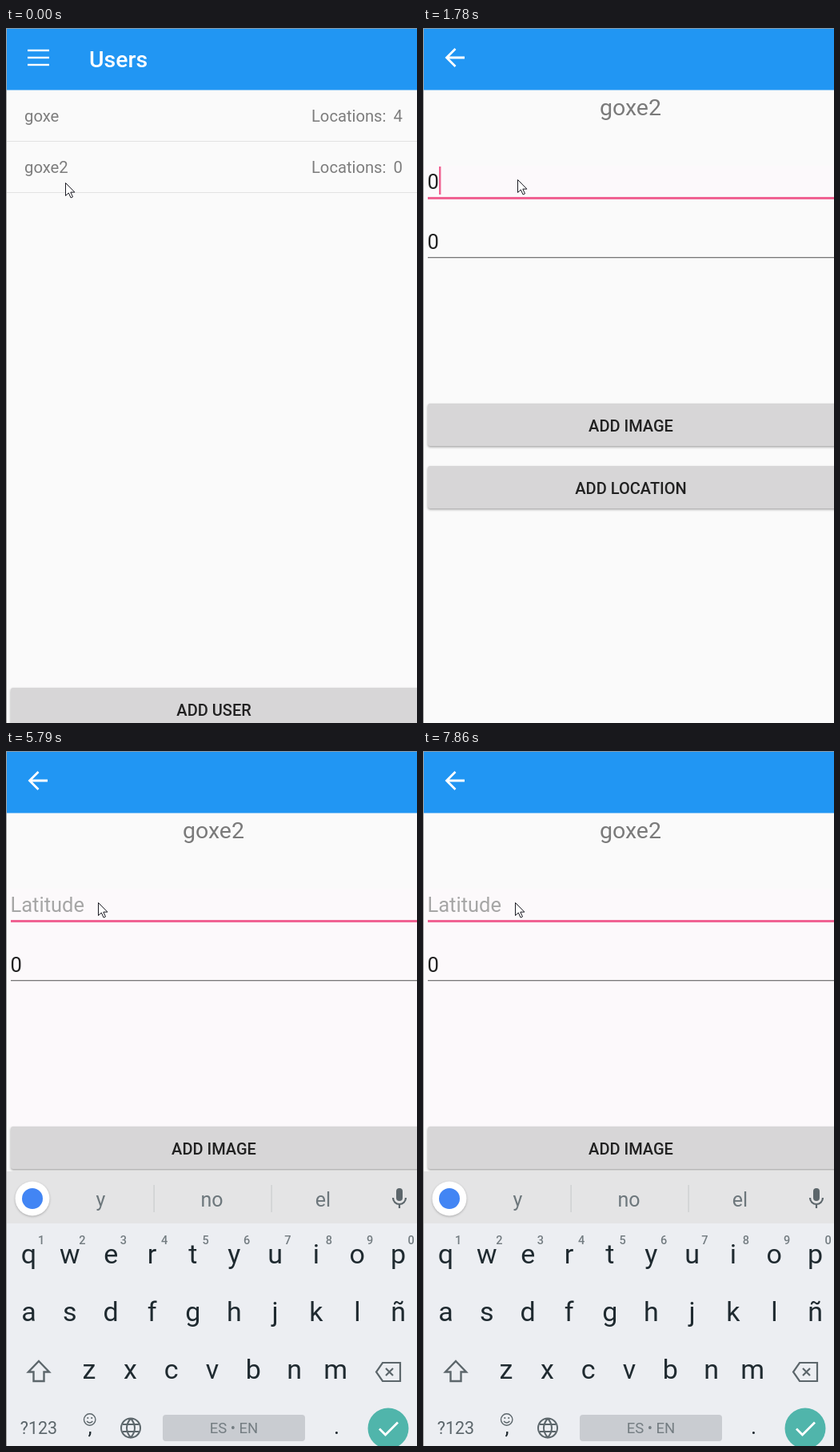
An HTML page with a canvas for the animation above (8 s loop, 514 by 868 pixels).

```html
<!DOCTYPE html>
<html lang="en">
<head>
<meta charset="utf-8">
<title>Add location</title>
<style>
  html, body { margin: 0; width: 100%; height: 100%; overflow: hidden; background: #fafafa; }
  canvas { display: block; width: 514px; height: 868px; }
</style>
</head>
<body>
<canvas id="stage" width="514" height="868"></canvas>
<script>
const W = 514, H = 868, LOOP = 8000;
const ctx = document.getElementById('stage').getContext('2d');
const BLUE = '#2196f3', PINK = '#f06292', INK = '#212121', KEY = '#1f2a30', GREY = '#5c666b';

// [time, value] keys: the last one already passed holds
const held = (keys, t) => keys.reduce((v, [at, next]) => t >= at ? next : v, keys[0][1]);

const POINTER = [[0, [74, 193]], [790, [275, 480]], [940, [238, 345]], [1070, [189, 241]],
  [1220, [127, 197]], [1370, [118, 189]], [5140, [117, 189]], [5670, [115, 189]]];
const CARET = [[0, 0], [1780, 1], [2770, 0], [3280, 1], [3840, 0], [4270, 1], [4860, 0],
  [5260, 1], [5790, 0], [6220, 1], [6780, 0], [7200, 1], [7710, 0]];
const PAGE = [[0, 0], [390, 0.5], [510, 1]];
const KEYBOARD_DROP = [[0, H], [2180, 90], [2330, 0]];
const POPUP = [[0, 0], [6500, 0.45], [6650, 1], [7200, 0.5], [7320, 0]];

function rect(x, y, w, h, color) {
  ctx.fillStyle = color;
  ctx.fillRect(x, y, w, h);
}

function roundRect(x, y, w, h, r, color) {
  ctx.fillStyle = color;
  ctx.beginPath();
  ctx.roundRect(x, y, w, h, r);
  ctx.fill();
}

function disc(x, y, r, color) {
  ctx.fillStyle = color;
  ctx.beginPath();
  ctx.arc(x, y, r, 0, Math.PI * 2);
  ctx.fill();
}

function text(str, x, y, size, color, align = 'left', weight = 400) {
  ctx.font = `${weight} ${size}px Roboto, sans-serif`;
  ctx.textAlign = align;
  ctx.fillStyle = color;
  ctx.fillText(str, x, y);
}

function stroke(path, color, width) {
  ctx.strokeStyle = color;
  ctx.lineWidth = width;
  ctx.stroke(new Path2D(path));
}

function shadow(color, blur, y) {
  ctx.shadowColor = color;
  ctx.shadowBlur = blur;
  ctx.shadowOffsetY = y;
}

function layer(alpha, draw) {
  if (alpha <= 0) return;
  ctx.save();
  ctx.globalAlpha = alpha;
  draw();
  ctx.restore();
}

function button(label, y) {
  ctx.save();
  shadow('rgba(0,0,0,.35)', 3, 1.5);
  roundRect(6, y, 512, 53, 3, '#d7d6d7');
  ctx.restore();
  text(label, 260, y + 34.5, 20, INK, 'center', 500);
}

function base() {
  rect(0, 0, W, H, '#fafafa');
  rect(0, 0, W, 77.5, BLUE);
}

function frameEdge() {
  rect(0, 0, 1, H, '#a3a3a3');
  rect(0, 0, W, 1, '#8c9aa5');
}

function usersPage(t) {
  base();
  for (const y of [28, 37, 46]) rect(27, y - 1.2, 27, 2.4, '#fff');
  text('Users', 104, 48.5, 28.4, '#fff', 'left', 500);
  if (t >= 270) rect(1, 142, W, 63, '#e4e4e4');
  [['goxe', 4], ['goxe2', 0]].forEach(([name, count], i) => {
    const y = 117 + i * 64;
    text(name, 23, y, 20.3, '#7d7d7d');
    text('Locations:', 382, y, 20.2, '#7d7d7d');
    text(count, 496, y, 20.3, '#7d7d7d', 'right');
    rect(1, y + 24, W, 1, '#e2e2e2');
  });
  button('ADD USER', 824);
}

function userPage(t) {
  const focused = t >= 1780, cleared = t >= 2180;
  base();
  stroke('M52 37H30M40.5 26L29.5 37L40.5 48', '#fff', 2.8);
  text('goxe2', 259.5, 109, 28.5, '#7a7a7a', 'center');
  if (focused) rect(1, 172, W, cleared ? 297 : 41, '#fcf9fb');

  if (cleared) text('Latitude', 5.5, 201, 25.5, t >= 6070 && t < 7320 ? '#808080' : '#a6a6a6');
  else text('0', 5.5, 201, 25.5, INK);
  if (focused) rect(6, 211, W, 3, PINK);
  else rect(6, 210.5, W, 2.5, '#b5b3b5');
  if (held(CARET, t)) rect(cleared ? 6 : 20, 173, 2.4, 35, PINK);

  text('0', 5.5, 275.5, 25.5, INK);
  rect(6, 286, W, 1.3, '#777');
  button('ADD IMAGE', 469);
  button('ADD LOCATION', 547);
}

function letters(row, x, y) {
  [...row].forEach((c, i) => text(c, x + i * 51.35, y, 34, KEY, 'center'));
}

function microphone() {
  roundRect(488, 546, 8, 16, 4, GREY);
  stroke('M484 558a8 8 0 0 0 16 0M492 566V571', GREY, 2.2);
}

function suggestions() {
  rect(1, 525, W, 65, '#e4e4e5');
  ['y', 'no', 'el'].forEach((word, i) =>
    text(word, 118.5 + i * 139, 569, 25, '#6d777c', 'center'));
  for (const x of [185, 332]) rect(x - 0.5, 542, 1.2, 34, '#c9ccce');
}

function keyboard(t) {
  rect(1, 525, W, H, '#eceef2');
  rect(1, 525, W, 65, '#e4e4e9');
  if (t >= 2460) suggestions();
  ctx.save();
  shadow('rgba(0,0,0,.25)', 3, 1);
  disc(33, 559, 21.5, '#fff');
  ctx.restore();
  disc(33, 559, 13, '#4285f4');
  microphone();

  letters('qwertyuiop', 28.5, 640);
  [...'1234567890'].forEach((d, i) =>
    text(d, 44 + i * 51.4, 615.5, 14.5, '#737c81', 'center', 500));
  letters('asdfghjklñ', 28.5, 712);
  letters('zxcvbnm', 104, 784);

  stroke('M41 762L54 775.5H47.5V787H34.5V775.5H28Z', GREY, 2.4);
  stroke('M471 764H493V787H471L463 775.5ZM475 771L484 780M484 771L475 780', GREY, 2.2);

  text('?123', 41, 853, 21.5, GREY, 'center');
  stroke('M97.5 835a7.2 7.2 0 1 0 14.4 0a7.2 7.2 0 1 0 -14.4 0M101 837q3.7 4 7.4 0', GREY, 1.4);
  disc(102.3, 833, 1.1, GREY);
  disc(107.2, 833, 1.1, GREY);
  text(',', 105, 853, 26, KEY, 'center');

  stroke('M144 845.5a12 12 0 1 0 24 0a12 12 0 1 0 -24 0M146 841H166M146 850H166' +
    'M156 833.5q-10 12 0 24q10 -12 0 -24', GREY, 2);
  roundRect(196, 829, 178, 33, 4, '#c9ccd1');
  text('ES • EN', 285, 852, 18.5, '#747d82', 'center');
  text('.', 413.5, 853, 27, KEY, 'center');
  disc(478, 846, 25.5, '#50b5ab');
  stroke('M467 846.5L474.5 854L490 838.5', '#fff', 2.8);
}

function popup() {
  ctx.save();
  shadow('rgba(0,0,0,.28)', 26, 7);
  roundRect(25, 58, 272, 75, 6, '#fafafa');
  ctx.restore();
  rect(109.5, 58, 1.2, 75, '#b9b9b9');
  text('Pegar', 42, 103, 18.6, '#303030');
  text('Frases frecuentes', 128.5, 103, 18.7, '#303030');
}

function pointer(x, y) {
  ctx.save();
  ctx.translate(x + 0.5, y + 0.5);
  const arrow = new Path2D('M0 0V16L3.8 12.5L6.6 18.5L9 17.4L6.3 11.6H11.4Z');
  ctx.fillStyle = '#fff';
  ctx.fill(arrow);
  ctx.strokeStyle = '#1a1a22';
  ctx.lineWidth = 1;
  ctx.stroke(arrow);
  ctx.restore();
}

function render(t) {
  const page = held(PAGE, t), drop = held(KEYBOARD_DROP, t);
  if (page < 1) usersPage(t);
  layer(page, () => userPage(t));
  if (drop < H) {
    ctx.save();
    ctx.translate(0, drop);
    keyboard(t);
    ctx.restore();
  }
  layer(held(POPUP, t), popup);
  frameEdge();
  pointer(...held(POINTER, t));
}

const start = performance.now();
function tick() {
  render((performance.now() - start) % LOOP);
  requestAnimationFrame(tick);
}
tick();
</script>
</body>
</html>
```
